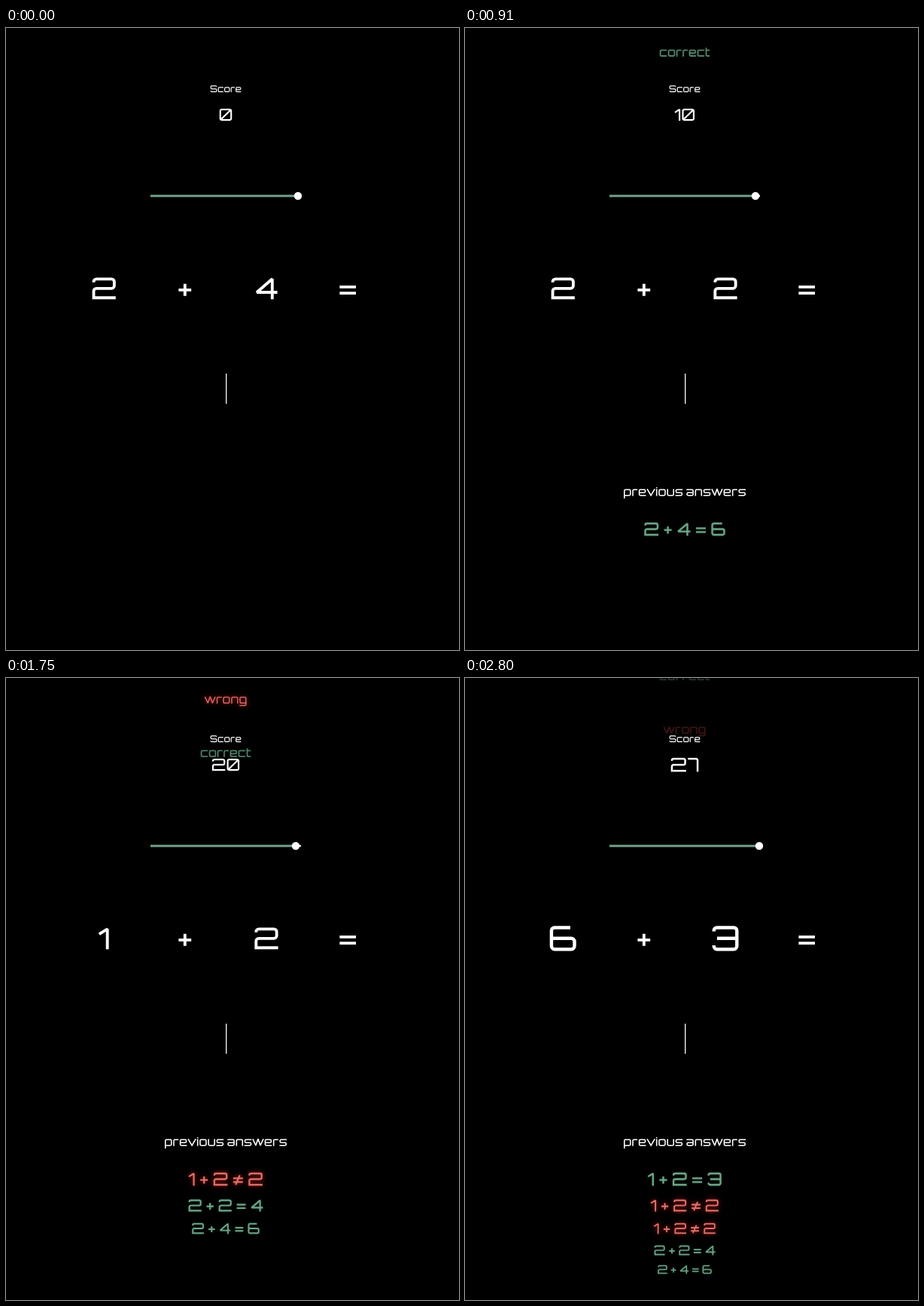
An HTML page with a canvas that plays this animation: 602 by 826 pixels, repeating every 2.87 s.

```html
<!DOCTYPE html>
<html lang="en">
<head>
<meta charset="utf-8">
<title>Quick sums</title>
<style>
  html, body { margin: 0; height: 100%; overflow: hidden; background: #000; }
  canvas { display: block; }
</style>
</head>
<body>
<canvas id="stage" width="602" height="826" role="img" aria-label="Sum game: Score, timer, previous answers"></canvas>
<script>
const ctx = document.getElementById('stage').getContext('2d');
const LOOP = 2870, MID = 292, PUSH = 71;
const WHITE = '#fff', GREEN = '#6fa688', RED = '#d9706a';
const GLOW = { [GREEN]: ['#16382a', 3], [RED]: ['#b81414', 6] };

// Stroke font in 1/100 em: each glyph is a width and lines of (x code, y code) points.
const STROKE = 9.6, CORNER = 9, GAP = 10;
const X = {
  L: w => 0, l: w => 4.8, e: w => 14, i: w => w * .28, m: w => w / 2,
  j: w => w * .72, s: w => w - 17, r: w => w - 4.8, R: w => w
};
const Y = {
  t: -72, T: -67.2, k: -63, d: -58, X: -57, U: -56, x: -52.2, Q: -50, p: -51, a: -41, H: -36,
  P: -31, h: -28, G: -23, b: -20, V: -16, q: -11, c: -5, B: -4.8, 0: 0, D: 15, E: 20
};
const GLYPHS = {
  ' ': [11, ''],
  0: [74, 'mT rT rB lB lT mT;lB rT'],
  1: [32, 'LQ rT r0'],
  2: [78, 'lU lT rT rH lH lB lB RB'],
  3: [76, 'lU lT rT rB lB lV;eH rH'],
  4: [73, 'RG lG sT s0'],
  5: [76, 'RT lT lT lH rH rB LB'],
  6: [76, 'sT lT lB rB rH lH'],
  7: [54, 'LT rT r0'],
  8: [78, 'mT rT rB lB lT mT;lH rH'],
  9: [76, 'eB rB rT lT lH rH'],
  '+': [42, 'LP RP;mp mq'],
  '=': [54, 'La Ra;Lb Rb'],
  '≠': [54, 'La Ra;Lb Rb;ec sd'],
  S: [70, 'rU rT lT lH rH rB lB lV'],
  a: [58, 'Lx rx rB lB lh rh'],
  c: [58, 'Rx lx lB RB'],
  e: [58, 'RB lB lx rx rh lh'],
  g: [58, 'rB lB lx rx rD LD'],
  i: [10, 'lX l0;lt lk'],
  n: [58, 'l0 lx rx r0'],
  o: [58, 'mx rx rB lB lx mx'],
  p: [58, 'lE lx rx rB lB'],
  r: [42, 'l0 lx Rx'],
  s: [58, 'Rx lx lh rh rB LB'],
  t: [34, 'lt lB RB;lx Rx'],
  u: [58, 'lX lB rB rX'],
  v: [62, 'LX mB RX'],
  w: [85, 'LX iB mX jB RX']
};

const EVENTS = [
  { at: 449, line: '2 + 4 = 6', ok: true, score: 0 },
  { at: 1240, line: '2 + 2 = 4', ok: true, score: 10 },
  { at: 1469, line: '1 + 2 ≠ 2' },
  { at: 1923, line: '1 + 2 ≠ 2' },
  { at: 2738, line: '1 + 2 = 3', ok: true, score: 20 }
];
// Each round: start, the two numbers, slider position at the start.
const ROUNDS = [[0, 2, 4, 387.6], [449, 2, 2, 390.8], [1240, 1, 2, 390.3], [2738, 6, 3, 391.5]];
const CURSOR_OFF = [[280, 420], [949, 1240], [2423, 2738]];
const LIST_Y = [665.5, 700.5, 731, 760, 785.5];

function tracePolyline(points) {
  const last = points.length - 1;
  points.forEach(([x, y], n) => {
    if (!n) return ctx.moveTo(x, y);
    const [px, py] = points[n - 1], [nx, ny] = points[Math.min(n + 1, last)];
    const square = (px === x || py === y) && (nx === x || ny === y);
    if (n < last && square) ctx.arcTo(x, y, nx, ny, CORNER);
    else ctx.lineTo(x, y);
  });
}

// Writes a centred string; cy is the middle of the capitals.
function write(string, cx, cy, size, color = WHITE, alpha = 1) {
  const chars = [...String(string)];
  const width = chars.reduce((sum, c) => sum + GLYPHS[c][0] + GAP, -GAP);
  ctx.save();
  ctx.translate(cx, cy);
  ctx.scale(size / 100, size / 100);
  ctx.translate(-width / 2, 36);
  ctx.globalAlpha = alpha;
  ctx.strokeStyle = color;
  ctx.lineWidth = STROKE;
  ctx.miterLimit = 2;
  if (GLOW[color]) [ctx.shadowColor, ctx.shadowBlur] = GLOW[color];
  for (const c of chars) {
    const [w, path] = GLYPHS[c];
    ctx.beginPath();
    if (path) for (const line of path.split(';'))
      tracePolyline(line.split(' ').map(([x, y]) => [X[x](w), Y[y]]));
    ctx.stroke();
    ctx.translate(w + GAP, 0);
  }
  ctx.restore();
}

function drawMessages(t, past) {
  if (!past.length) return;
  const top = 33 - 64 * Math.exp(-.0092 * (t - past[0].at));
  past.slice(0, 2).forEach((e, n) => {
    const age = t - e.at;
    const alpha = Math.min(1, age / 110) ** 2 * Math.max(0, 1 - (age / 980) ** 2.3);
    if (alpha > 0)
      write(e.ok ? 'correct' : 'wrong', MID, top + n * PUSH, 16.2, e.ok ? GREEN : RED, alpha);
  });
}

function drawSlider(x) {
  ctx.fillStyle = WHITE;
  ctx.fillRect(192, 221.8, 200, 2.4);
  ctx.fillStyle = GREEN;
  ctx.fillRect(192, 221.8, x - 192, 2.4);
  ctx.fillStyle = WHITE;
  ctx.beginPath();
  ctx.arc(x, 223, 5.2, 0, 7);
  ctx.fill();
}

function draw(t) {
  ctx.fillStyle = '#000';
  ctx.fillRect(0, 0, 602, 826);

  const past = EVENTS.filter(e => e.at <= t).reverse();
  const win = past.find(e => e.ok);
  const age = win ? t - win.at : 1e4;
  const pop = 1 + .2 * Math.sin(Math.PI * Math.min(1, age / 230));
  const score = win ? win.score + Math.round(10 * (1 - Math.exp(-.0175 * age))) : 0;
  const [start, a, b, slider] = ROUNDS.filter(r => r[0] <= t).pop();

  drawMessages(t, past);
  write('Score', MID, 80.8, 12.5);
  write(score, MID, 115.2, 22.4 * pop);
  drawSlider(Math.round(slider - .0095 * (t - start)));

  write(a, 130.2, 345.8, 40 * pop);
  write('+', 237.8, 345.8, 40);
  write(b, 346, 345.8, 40 * pop);
  write('=', 454.2, 345.8, 40);

  if (!CURSOR_OFF.some(([from, to]) => t >= from && t < to)) {
    ctx.fillStyle = '#eee';
    ctx.fillRect(292, 459, 1.4, 40);
  }

  if (past.length) write('previous answers', MID, 615.6, 16.5);
  past.forEach((e, n) => write(e.line, MID, LIST_Y[n], 24 - 2 * n, e.ok ? GREEN : RED));
}

const begin = performance.now();
function tick() {
  draw((performance.now() - begin) % LOOP);
  requestAnimationFrame(tick);
}
tick();
</script>
</body>
</html>
```
